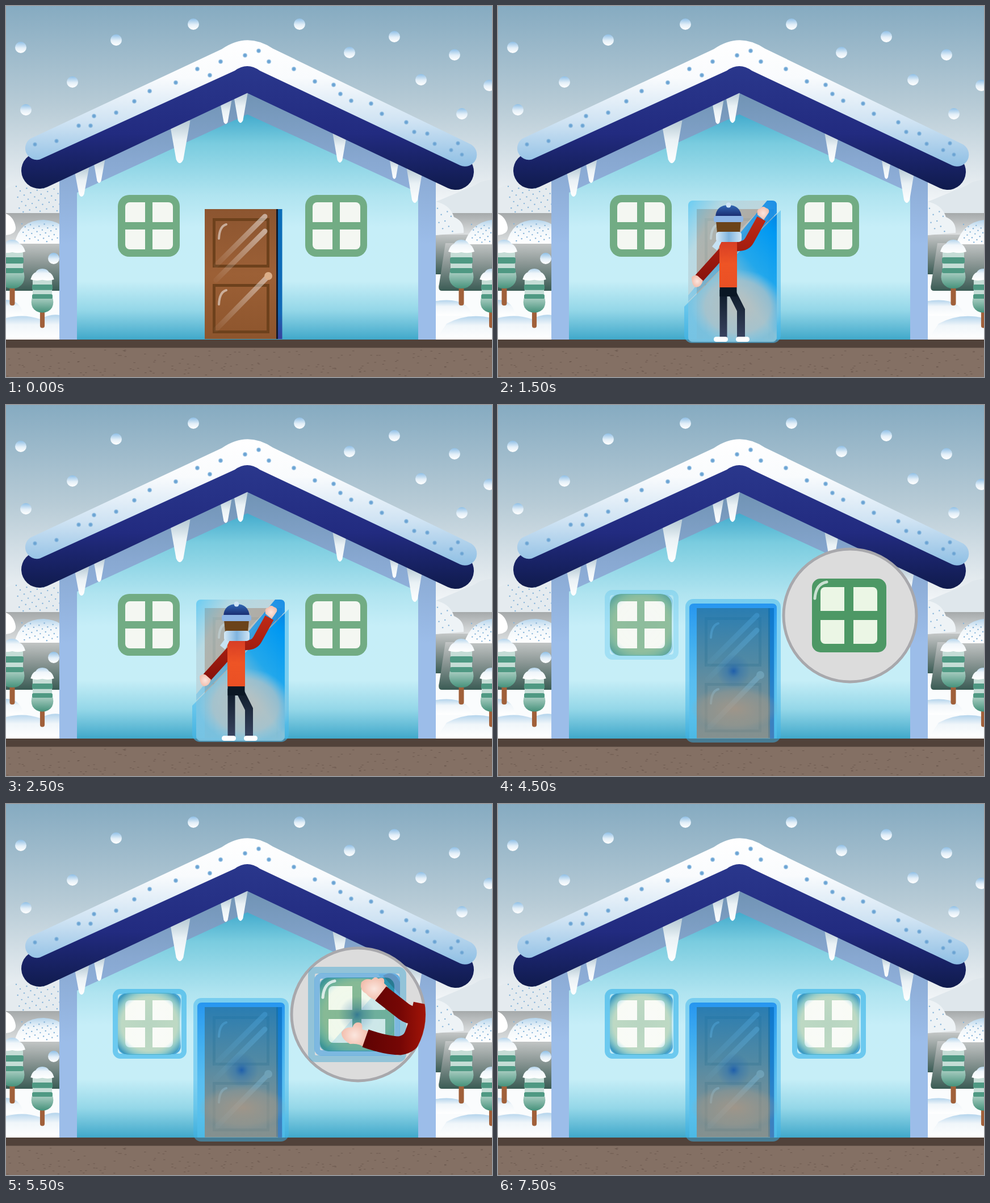
Write an HTML page that moves like this. It is 856 px wide and 654 px high and loops after 8 s.

```html
<!DOCTYPE html>
<html lang="en">
<head>
<meta charset="utf-8">
<title>Winter house</title>
<style>
html, body { margin: 0; width: 100%; height: 100%; overflow: hidden; }
svg { display: block; width: 856px; height: 654px; }
</style>
</head>
<body>
<svg id="stage" viewBox="0 0 856 654"></svg>
<script>
// ---- helpers -------------------------------------------------------------
const stops = list => list.map(([at, color, alpha = 1]) =>
  `<stop offset="${at}" stop-color="${color}" stop-opacity="${alpha}"/>`).join('');
// Vertical gradient; with y1 and y2 it is fixed to the stage
const vertical = (id, list, y1, y2) => `<linearGradient id="${id}" x1="0" x2="0" ` +
  (y2 ? `y1="${y1}" y2="${y2}" gradientUnits="userSpaceOnUse"` : 'y1="0" y2="1"') +
  `>${stops(list)}</linearGradient>`;
const radial = (id, list, extra = '') => `<radialGradient id="${id}" ${extra}>${stops(list)}</radialGradient>`;
const rect = (x, y, w, h, fill, rx = 0, extra = '') =>
  `<rect x="${x}" y="${y}" width="${w}" height="${h}" rx="${rx}" fill="${fill}" ${extra}/>`;
const path = (d, fill, extra = '') => `<path d="${d}" fill="${fill}" ${extra}/>`;
const line = (d, color, width, extra = '') =>
  `<path d="${d}" fill="none" stroke="${color}" stroke-width="${width}" ${extra}/>`;
const circle = (x, y, r, fill, extra = '') => `<circle cx="${x}" cy="${y}" r="${r}" fill="${fill}" ${extra}/>`;
const ellipse = (x, y, rx, ry, fill) => `<ellipse cx="${x}" cy="${y}" rx="${rx}" ry="${ry}" fill="${fill}"/>`;
// Rounded border of the given width drawn inside a box
const ring = (x, y, w, h, border, color, rx, alpha) =>
  `<rect x="${x + border / 2}" y="${y + border / 2}" width="${w - border}" height="${h - border}" rx="${rx}" ` +
  `fill="none" stroke="${color}" stroke-width="${border}" opacity="${alpha}"/>`;
const part = (name, content, extra = '') => `<g data-part="${name}" ${extra}>${content}</g>`;
const round = 'stroke-linecap="round" stroke-linejoin="round"';

let seed = 7;
const random = () => (seed = (seed * 16807) % 2147483647) / 2147483647;
const scatter = (count, draw) => Array.from({ length: count }, draw).join('');
const dots = (x, y, w, h, count) => scatter(count, (_, i) =>
  circle(x + w * ((i * 0.618) % 1), y + h * (i + random()) / count, 1.2, '#86b3d8'));

// ---- paints --------------------------------------------------------------
const defs = `<defs>
${vertical('sky', [[0, '#86abc1'], [.5, '#b7cbd6'], [.9, '#e6ecf0'], [1, '#f4f7f9']], 0, 350)}
${vertical('flake', [[0, '#8fbfe6'], [.55, '#e3eff8'], [1, '#fff']])}
${vertical('ridge', [[0, '#a5a9aa'], [1, '#dfe2e3']])}
${vertical('forest', [[0, '#c3c6c6'], [.4, '#8f9a98'], [1, '#3a5b54']])}
${vertical('mound', [[0, '#b4d4ec'], [.4, '#f0f6fa'], [1, '#fff']])}
${vertical('leaf', [[0, '#b5d4ca'], [1, '#46927b']])}
${vertical('frame', [[0, '#7093b4'], [.45, '#88a8d1'], [1, '#9cbde9']], 152, 420)}
${vertical('wall', [[0, '#43abcd'], [.13, '#7accdf'], [.36, '#b0e4f0'], [.5, '#c6eef8'], [.74, '#c6eef7'], [.87, '#94d7e8'], [1, '#40a8ca']], 191, 588)}
${vertical('roof', [[0, '#2a378c'], [.55, '#222b80'], [1, '#101b4e']], 106, 322)}
${vertical('snow', [[0, '#fff'], [.3, '#f9fbfd'], [.65, '#cfe3f3'], [1, '#8fbfe4']], 60, 282)}
${vertical('ice', [[0, '#b5c9d4'], [.45, '#e9f1f5'], [1, '#fff']])}
${radial('dot', [[0, '#5f9bce'], [.6, '#7db0da'], [1, '#a9cdea', 0]])}
${vertical('wood', [[0, '#8c5530'], [.5, '#9c6036'], [1, '#8d552d']])}
${vertical('edge', [[0, '#0b6db8'], [.8, '#1269b6'], [1, '#3a3f9c']])}
<linearGradient id="shine" x1="1" y1="0" x2="0" y2="1">${stops([[0, '#fff', .5], [1, '#fff', .04]])}</linearGradient>
${vertical('glass', [[0, '#0a78c4', .65], [.4, '#2f88bc', .45], [.7, '#7f97a0', .5], [1, '#a09a90', .55]])}
${vertical('glassEdge', [[0, '#188cf0', .85], [.3, '#259fee', .7], [1, '#5cc8f2', .4]])}
${radial('warm', [[0, '#c79b7c', .5], [.75, '#b09c88', .3], [1, '#a59a8c', 0]])}
${radial('spot', [[0, '#1456ac', .85], [.4, '#2a6cac', .45], [1, '#2a6cac', 0]])}
${radial('pane', [[0, '#fff', .5], [.7, '#fcfef8', .55], [.83, '#a5dcec', .65], [1, '#2c93cc', .8]], 'r=".63"')}
<linearGradient id="peel" x1="1" y1="0" x2=".25" y2="1">${stops([[0, '#0a78d8'], [.16, '#0098f2'], [.42, '#1aa6ee', .9], [.62, '#8cc3d6', .8], [1, '#7cc6e4', .7]])}</linearGradient>
${radial('pale', [[0, '#c3c0ba', .85], [.7, '#b9c4c6', .65], [1, '#a5cfe0', 0]])}
<linearGradient id="sheet" x1="0" y1="0" x2="1" y2="1">${stops([[0, '#5cc8f4', .85], [.2, '#b4d3dc', .75], [.5, '#c2ced2', .7]])}</linearGradient>
<linearGradient id="fold" x1="1" y1="0" x2="0" y2="1">${stops([[0, '#0a86e6', .9], [.5, '#16a0f0', .7], [1, '#4cbcf0', .35]])}</linearGradient>
${vertical('hat', [[0, '#3268b4'], [1, '#18286c']])}
<linearGradient id="scarf">${stops([[0, '#d5e9f6'], [.5, '#7fb4de'], [1, '#d0e5f5']])}</linearGradient>
${vertical('shirt', [[0, '#d63c24'], [.5, '#ee5425'], [1, '#ea5024']])}
${vertical('sleeve', [[0, '#c02a16'], [1, '#85100a']], 370, 490)}
${vertical('trousers', [[0, '#0a1724'], [1, '#38435f']], 496, 585)}
${radial('skin', [[0, '#fbe6de'], [1, '#f3bfae']])}
<linearGradient id="arm" x1="630" x2="738" y1="0" y2="0" gradientUnits="userSpaceOnUse">${stops([[0, '#5f0303'], [.6, '#760705'], [1, '#a11408']])}</linearGradient>
<clipPath id="diagonal"><path d="M498 360V595H328V530Z"/></clipPath>
<clipPath id="disc"><circle cx="620" cy="371" r="119"/></clipPath>
</defs>`;

// ---- scenery -------------------------------------------------------------
const tree = (x, y, scale) => `<g transform="translate(${x} ${y}) scale(${scale})">
${rect(-4.5, 80, 9, 36, '#a0603a', 4)}
${rect(-19, 20, 38, 40, '#c5ddd6', 4)}${rect(-20, 31, 40, 11, '#4f9983', 3)}
${path('M-19 54H19Q24 66 19 76Q13 86 0 86Q-13 86-19 76Q-24 66-19 54Z', 'url(#leaf)')}
${rect(-20, 50, 40, 9, '#4f9983', 3)}
${path('M-23 21Q-20 10-13 7Q-9 0 0 0Q9 0 13 7Q20 10 23 21Q12 25 0 22Q-12 25-23 21Z', 'url(#mound)')}</g>`;

const flakes = [[26, 73], [194, 60], [330, 32], [517, 32], [605, 82], [684, 54], [790, 86], [731, 130],
  [851, 140], [803, 190], [117, 134], [35, 183], [84, 445]];

const background = rect(0, 0, 856, 654, 'url(#sky)') + rect(0, 350, 856, 240, '#fafcfd') +
  path('M0 322Q40 300 95 312V366H0Z', '#e5ebef') + dots(18, 318, 78, 46, 32) +
  path('M757 345V366H856V306Q836 308 826 316Z', '#dfe7ec') +
  rect(0, 365, 95, 55, 'url(#ridge)') + path('M0 366Q14 372 17 390Q18 402 0 404Z', '#fff') +
  rect(0, 418, 95, 84, 'url(#forest)') +
  path('M15 419Q24 377 66 377Q84 378 95 385V419Z', 'url(#mound)') + dots(28, 383, 64, 33, 28) +
  rect(757, 365, 99, 40, 'url(#ridge)') + rect(757, 403, 99, 70, 'url(#forest)') +
  path('M757 345Q782 350 789 372Q808 380 806 400L757 404Z', '#eef3f6') + dots(760, 355, 28, 44, 9) +
  path('M774 418H856V502H768Q760 502 763 490Z', 'url(#forest)') +
  path('M807 420Q818 382 856 377V420Z', 'url(#mound)') + dots(820, 384, 36, 34, 18) +
  path('M0 518Q26 518 31 546H0Z', 'url(#mound)') + path('M0 550Q32 542 60 552Q78 542 95 545V588H0Z', 'url(#mound)') +
  path('M757 520Q812 512 822 546H757Z', 'url(#mound)') + path('M776 560Q812 540 856 550V588H757Z', 'url(#mound)') +
  tree(11, 412, 1) + tree(64, 463, .9) + tree(802, 412, 1) + tree(855, 463, .9) +
  flakes.map(([x, y]) => circle(x, y, 10, 'url(#flake)')).join('');

const ground = rect(0, 588, 856, 15, '#51423a') + rect(0, 602.5, 856, 52, '#847064') +
  scatter(210, (_, i) => rect((i * 61.8 + random() * 12) % 856, 606 + random() * 46, 3.5, 1, '#6d5a50'));

// Centre of the tip, top, width and height
const icicle = ([x, y, w, h]) => {
  const tip = w * .17;
  return path(`M${x - w / 2} ${y}L${x - tip} ${y + h - tip}Q${x} ${y + h + tip} ${x + tip} ${y + h - tip}L${x + w / 2} ${y}Z`, 'url(#ice)');
};
const icicles = [[133, 284, 27, 52], [164, 270, 21, 42], [306, 202, 37, 75], [387, 166, 21, 42],
  [413, 152, 26, 54], [588, 222, 26, 54], [684, 270, 17, 35], [720, 285, 29, 62]];

const roofDots = [[51, 244], [89, 238], [128, 211], [149, 211], [155, 194], [194, 188], [226, 168], [253, 150],
  [299, 135], [337, 111], [359, 122], [378, 98], [421, 87], [445, 79], [463, 98], [507, 111], [544, 133],
  [577, 139], [589, 155], [608, 167], [643, 172], [662, 190], [705, 205], [719, 222], [742, 225], [755, 243],
  [784, 254], [796, 242], [803, 262]];

const house = path('M94 305L425 148L757 305V588H94Z', 'url(#frame)') +
  path('M425 191L726 329V588H125V329Z', 'url(#wall)') + icicles.map(icicle).join('') +
  line('M59 290L425 118L792 292', 'url(#roof)', 64, round) +
  path('M42.5 234L380 76Q425 45 470 75L817 243A20.5 20.5 0 0 1 800 281L447 114Q425 98 403 114L59.6 270.5A20.5 20.5 0 0 1 42.5 234Z', 'url(#snow)') +
  roofDots.map(([x, y]) => circle(x, y, 4.8, 'url(#dot)')).join('');

const windowAt = x => rect(x, 333, 109, 109, '#72ac84', 20) + rect(x + 13, 346, 84, 83, '#f4f7f2', 8) +
  rect(x + 48, 345, 13, 85, '#72ac84') + rect(x + 12, 381, 86, 13, '#72ac84');

const panel = y => rect(366.5, y + 2.5, 95, 82, 'none', 0, 'stroke="#6d411c" stroke-width="5"') +
  line(`M375 ${y + 36}Q376 ${y + 14} 388 ${y + 11}`, '#fff', 4, 'opacity=".5" stroke-linecap="round"');
const door = rect(350, 358, 127, 229, 'url(#wood)') + rect(476, 358, 3.5, 229, '#151a28') +
  rect(479, 358, 7.5, 229, 'url(#edge)') + panel(374) + panel(490) +
  ['M456 371L370 457', 'M456 397L370 483', 'M462 476L370 570'].map(d => line(d, 'url(#shine)', 9, round)).join('') +
  circle(462, 476, 7, '#dbae88');

// ---- changing parts ------------------------------------------------------
const windowFilm = x => ring(x - 9, 326, 130, 123, 9, '#36b3ea', 9, .62) + rect(x, 334, 111, 107, 'url(#pane)', 14);

const doorFilm = rect(330, 342, 168, 253, '#3fb5ee', 14, 'opacity=".5"') +
  path('M337 588V358Q337 350 345 350H483Q491 350 491 358V588H486V358H350V588Z', 'url(#glassEdge)') +
  rect(350, 358, 136, 230, 'url(#glass)') + rect(479, 358, 7, 230, '#0870d4', 0, 'opacity=".45"') +
  ellipse(417, 535, 78, 40, 'url(#warm)') + circle(415, 469, 30, 'url(#spot)');

const peeling = rect(335, 343, 156, 249, 'url(#sheet)', 8) +
  `<g clip-path="url(#diagonal)">${rect(328, 346, 170, 248, '#47b9ee', 14, 'opacity=".6"') +
    rect(335, 343, 156, 249, 'url(#peel)', 8) + ellipse(422, 530, 82, 66, 'url(#pale)')}</g>` +
  path('M474 343H483Q491 343 491 351V365L335 521V510Z', 'url(#fold)');

const person = line('M397 500V586', 'url(#trousers)', 13) + line('M410 500L428 536V586', 'url(#trousers)', 14) +
  rect(390.5, 494, 30, 18, '#0a1724') +
  rect(380, 583, 25, 9, '#fff', 4.5) + rect(419, 583, 24, 9, '#fff', 4.5) +
  line('M399 430L354 480', 'url(#sleeve)', 17) + line('M416 423Q436 426 443 413L464 375', 'url(#sleeve)', 17) +
  path('M341 478Q347 472 352 476L361 484Q358 496 348 496Q341 492 341 478Z', 'url(#skin)') +
  path('M457 368Q455 357 462 357Q466 351 472 356Q479 358 477 364L468 377Z', 'url(#skin)') +
  rect(390, 413, 31, 83, 'url(#shirt)') + path('M384 379H428L426 400H386Z', '#6b431a') +
  path('M386 412L377 424L386 431L394 415Z', '#c6e2f4') + rect(384, 398, 45, 18, 'url(#scarf)', 5) +
  path('M383 372Q384 351 406 351Q427 351 429 372Z', 'url(#hat)') + rect(380, 370, 52, 11, '#8db5e6', 4) +
  circle(406, 351, 4.5, '#cfe4f5');

const lensShine = line('M558 341Q560 315 579 312', '#fff', 5, 'opacity=".7" stroke-linecap="round"');
const lens = circle(620, 371, 117, '#dcdcdc', 'stroke="#a8a8ac" stroke-width="5"') +
  rect(553, 306, 131, 130, '#4d9865', 15) + rect(568, 321, 100, 100, '#ebf6e5', 8) +
  rect(610, 320, 16, 102, '#4d9865') + rect(567, 363, 102, 16, '#4d9865') + lensShine;

const lensFilm = ring(532, 287, 173, 168, 12, '#299fd3', 8, .68) +
  ring(543, 298, 151, 146, 10, '#1b93e6', 8, .8) + rect(552, 307, 133, 128, 'url(#pane)', 12) +
  path('M662 300H684Q694 300 694 312V388L648 443H554L650 334Z', '#2f9cdc', 'opacity=".3"') +
  path('M656 300H684Q694 300 694 312V372Z', '#0b8de8', 'opacity=".8"') +
  path('M664 303Q682 290 694 314V337Z', '#0f5da4', 'opacity=".8"') +
  circle(618, 371, 32, 'url(#spot)') + lensShine;

const hands = path('M652 346Q640 342 634 334Q622 328 626 314Q634 306 644 310Q650 302 656 308Q668 303 666 316L672 322Z', 'url(#skin)') +
  path('M632 430Q622 421 606 423Q590 414 591 402Q598 392 610 394Q614 382 625 386Q629 391 627 397L637 400Z', 'url(#skin)') +
  line('M660 334L701 366Q715 376 732 371', 'url(#arm)', 32) +
  line('M633 413Q670 426 694 426Q712 423 718 408Q728 382 734 352', 'url(#arm)', 33);

const stage = document.getElementById('stage');
stage.innerHTML = defs + background + ground + house + windowAt(197) + windowAt(527) + door +
  part('doorFilm', doorFilm) + part('peeling', peeling) + part('person', person) +
  part('leftFilm', windowFilm(197)) + part('rightFilm', windowFilm(527)) +
  part('lens', lens + part('lensFilm', lensFilm) + part('hands', hands, 'clip-path="url(#disc)"'));

// Opacity of each part as [start in ms, value] steps
const timeline = {
  peeling: [[1500, 1], [3500, 0]],
  person: [[1500, 1], [3500, 0]],
  doorFilm: [[3500, 1]],
  leftFilm: [[4500, .4], [5500, 1]],
  lens: [[4500, 1], [7500, 0]],
  lensFilm: [[5500, .6], [6500, 1]],
  hands: [[5500, 1]],
  rightFilm: [[7500, 1]],
};
const parts = Object.entries(timeline).map(([name, steps]) =>
  [stage.querySelector(`[data-part=${name}]`), steps]);

function draw() {
  const time = performance.now() % 8000;
  for (const [element, steps] of parts) {
    const step = steps.filter(([start]) => start <= time).pop();
    element.setAttribute('opacity', step ? step[1] : 0);
  }
  requestAnimationFrame(draw);
}
draw();
</script>
</body>
</html>
```
